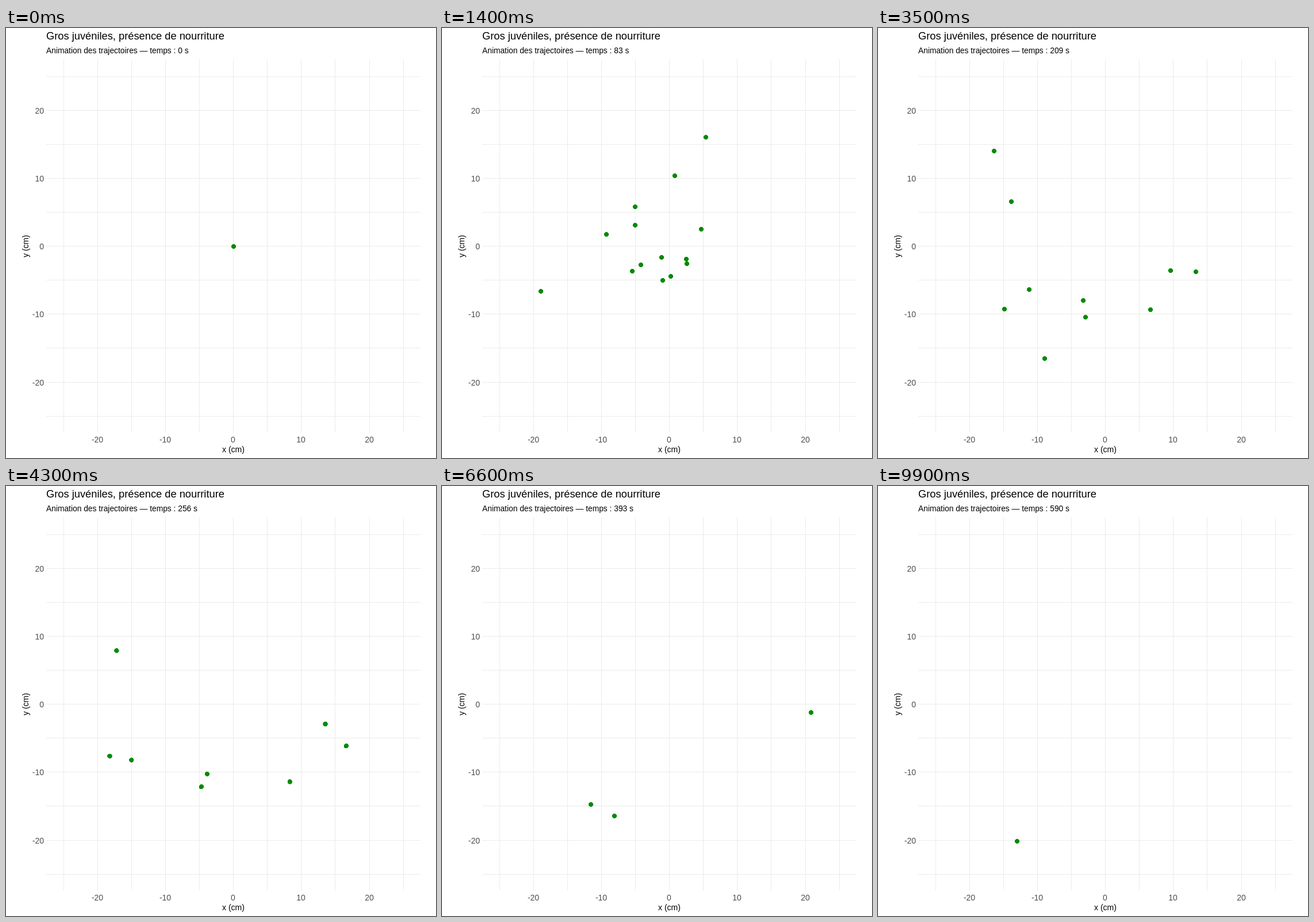
An HTML page for the animation above (10000 ms loop, 748 px wide and 748 px high).

```html
<!DOCTYPE html>
<html lang="fr">
<head>
<meta charset="utf-8">
<style>
  html, body { margin: 0; height: 100%; overflow: hidden; background: #fff; }
  svg { display: block; width: 748px; height: 748px; }
  text { font: 14px "Liberation Sans", Arial, sans-serif; }
  rect, circle { shape-rendering: crispEdges; }
  #grid { fill: #ebebeb; }
  #ticks { fill: #4d4d4d; }
  #dots { fill: #008b00; }
  .mid { text-anchor: middle; }
  .end { text-anchor: end; }
</style>
</head>
<body>
<svg viewBox="0 0 748 748">
  <g id="grid"></g>
  <g id="ticks"></g>
  <g id="dots"></g>
  <text x="70" y="20" style="font-size:18.3px">Gros juvéniles, présence de nourriture</text>
  <text id="sub" x="70" y="44" style="font-size:13.8px"></text>
  <text class="mid" x="395.5" y="738">x (cm)</text>
  <text class="mid" transform="translate(39 379.5) rotate(-90)">y (cm)</text>
</svg>
<script>
const $ = id => document.getElementById(id);

function add(parent, tag, attrs, text = "") {
  const el = document.createElementNS("http://www.w3.org/2000/svg", tag);
  for (const k in attrs) el.setAttribute(k, attrs[k]);
  el.textContent = text;
  return parent.appendChild(el);
}

// Grid every 5 cm, labels every 10 cm
for (let i = -5; i <= 5; i++) {
  const x = Math.floor(395.65 + 59.1 * i), y = Math.floor(379.65 - 59.1 * i);
  add($("grid"), "rect", { x, y: 54, width: 1, height: 650 });
  add($("grid"), "rect", { x: 70, y, width: 651, height: 1 });
  if (i % 2 === 0) {
    add($("ticks"), "text", { class: "mid", x, y: 721 }, i * 5);
    add($("ticks"), "text", { class: "end", x: 66, y: y + 6 }, i * 5);
  }
}

// Every animal leaves the centre and passes one point per key step.
// After its last point it swims straight on and vanishes at the rim.
const CENTRE = [396, 380], RIM = 250;
const KEYS = [0, 14, 35, 52, 66, 83, 99];
const paths = [
  [[459, 190]],
  [[405, 257]],
  [[286, 359]],
  [[172, 458]],
  [[336, 311], [202, 214]],
  [[336, 343], [232, 302]],
  [[451, 350], [553, 424]],
  [[384, 439], [290, 575]],
  [[346, 412], [263, 455], [168, 501]],
  [[331, 423], [220, 489], [136, 448]],
  [[426, 410], [474, 490], [516, 542]],
  [[425, 402], [509, 422], [608, 405], [642, 394]],
  [[398, 432], [361, 503], [316, 546], [259, 554]],
  [[382, 399], [357, 474], [342, 531], [300, 574], [262, 623], [242, 618]],
].map(points => [CENTRE, ...points]);
const dots = paths.map(() => add($("dots"), "circle", { r: 4.2 }));

function place(dot, path, step) {
  const next = KEYS.findIndex(k => k > 0 && k >= step);
  const n = Math.min(next, path.length - 1);
  const f = (step - KEYS[n - 1]) / (KEYS[n] - KEYS[n - 1]);
  const [x, y] = path[n].map((b, axis) => path[n - 1][axis] * (1 - f) + b * f);
  const inside = Math.hypot(x - CENTRE[0], y - CENTRE[1]) < RIM;
  dot.setAttribute("cx", x);
  dot.setAttribute("cy", y);
  dot.style.display = f <= 1 || inside ? "" : "none";
}

function tick() {
  const step = Math.floor(performance.now() % 10000 / 100);
  $("sub").textContent = `Animation des trajectoires — temps : ${Math.round(step * 590 / 99)} s`;
  dots.forEach((dot, i) => place(dot, paths[i], step));
  requestAnimationFrame(tick);
}
tick();
</script>
</body>
</html>
```
